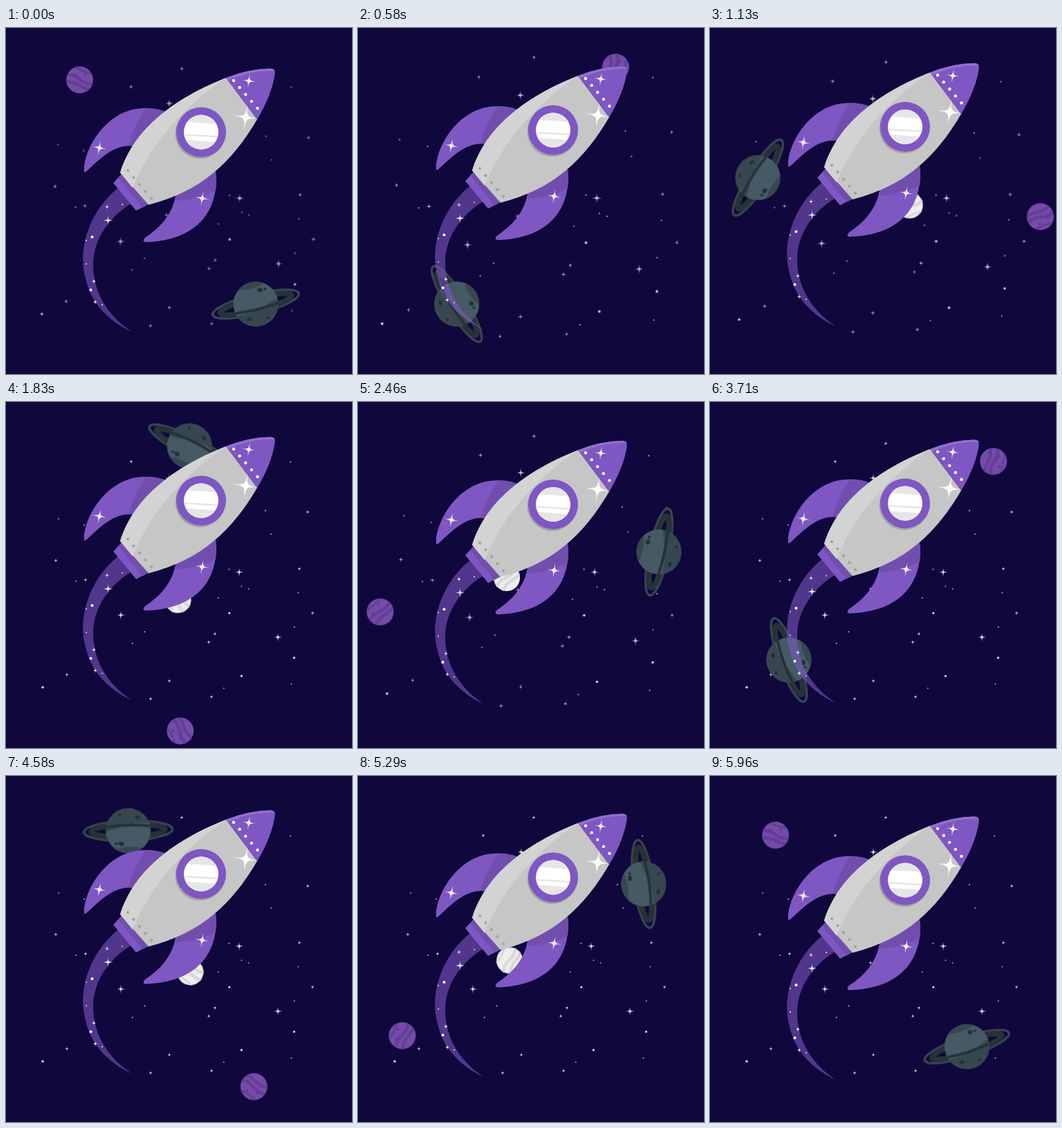
These frames come from a looping animation (500 by 500 pixels, 6 s). An HTML page:

```html
<!DOCTYPE html>
<html lang="en">
<head>
<meta charset="utf-8">
<title>Rocket in space</title>
<style>
html, body { margin: 0; width: 100%; height: 100%; overflow: hidden; background: #10073d; }
svg { display: block; width: 100vw; height: 100vh; }
</style>
</head>
<body>
<svg viewBox="0 0 500 500">
  <defs>
    <clipPath id="globe"><circle r="32.5"/></clipPath>
    <clipPath id="ball"><circle r="19.4"/></clipPath>
    <clipPath id="glass"><circle cx="282" cy="150.5" r="25"/></clipPath>
    <g id="stripes" clip-path="url(#ball)" fill="none" stroke-width="4.5">
      <path d="M-20,-8Q-9,-9 0,-1T20,6"/>
      <path d="M-20,3Q-8,2 0,8T18,14"/>
      <path d="M-6,-19Q4,-11 19,-9" stroke-width="3"/>
    </g>
  </defs>

  <g id="stars" fill="#fff" opacity=".82"></g>

  <g id="orbit">
    <g transform="translate(106.5 75)">
      <circle r="19.4" fill="#744ba9"/>
      <use href="#stripes" stroke="#623e97"/>
      <g fill="#5b388e"><circle cx="-7" cy="-8" r="2"/><circle cx="8" cy="-7" r="1.8"/></g>
    </g>
    <g transform="translate(230.8 217.9)">
      <circle r="19" fill="#eee"/>
      <use href="#stripes" stroke="#d8d8d8"/>
    </g>
    <g transform="translate(361 399)">
      <g transform="rotate(-14)" fill="none">
        <ellipse rx="64" ry="14.2" stroke="#37474f" stroke-width="3.5"/>
        <ellipse rx="53" ry="9.5" stroke="#263238" stroke-width="8"/>
      </g>
      <circle r="32.5" fill="#455a64"/>
      <g clip-path="url(#globe)">
        <g fill="#37474f">
          <path d="M-26,-20Q-4,-20 10,-29L20,-36H-20Z"/>
          <path d="M-34,18Q-8,16 10,4T36,-10V40H-34Z"/>
        </g>
        <g fill="#222f38">
          <ellipse cx="6" cy="-20.5" rx="3.8" ry="3"/><circle cx="13" cy="-22" r="2"/>
          <ellipse cx="-9" cy="22" rx="3.8" ry="2.5"/><circle cx="17" cy="20" r="2.2"/>
        </g>
      </g>
      <path transform="rotate(-14)" d="M-32,6Q0,10 32,6" fill="none" stroke="#263238" stroke-width="4"/>
    </g>
  </g>

  <g id="rocket">
    <path fill="#7e57c2" opacity=".6" d="M162,231C120,265 103,320 115,362C122,395 145,422 182,439C145,415 126,380 126,342C126,305 150,272 182,253Z"/>

    <g fill="#7e57c2">
      <path d="M113,207C111,174 154,95 231,121L187,171C160,166 140,185 118,205.5Q113,210 113,207Z"/>
      <path d="M303,207C309,272 268,308 201,309.5Q196,307.5 201,303C220,290 240,272 245,242Z"/>
      <path d="M168,210L155,224L188,264L205,255Z"/>
    </g>
    <g fill="#714eae">
      <path d="M202,116Q217,115.5 231,121L187,171L177,170Q184,143 202,116Z"/>
      <path d="M303,207Q305,222 303,235Q277,248 245,250V242Z"/>
      <path d="M168,210L162,216.5L197,259.5L206,255Z"/>
    </g>

    <path fill="#c6c6c6" d="M165,209C181,157 227,108 318,72L363,132C327,193 283,236 206,255.5Z"/>
    <path fill="#d3d3d3" d="M165,209C181,157 227,108 318,72C268,106 212,158 183,231Z"/>
    <path fill="#7e57c2" d="M318,72Q350,59 382,58.5Q390,59 388.5,67Q384,97 363,132Z"/>
    <path fill="#936fce" d="M318,72Q350,59 382,58.5Q388,59 388.5,62Q352,61 321,76Z"/>
    <g id="rivets" fill="#a2a2a2"></g>

    <circle cx="280.5" cy="153" r="36" fill="#a3a3a3"/>
    <circle cx="282" cy="150.5" r="36" fill="#7e57c2"/>
    <g clip-path="url(#glass)">
      <path fill="#fff" d="M250,120H310V180H250Z"/>
      <g fill="#e6e6e6">
        <path d="M250,120H310V139L250,135Z"/>
        <path d="M250,152.5L310,156V158.5L250,155Z"/>
        <path d="M250,161L310,165V180H250Z"/>
      </g>
    </g>
    <g id="sparks" fill="#fff"></g>
  </g>
</svg>
<script>
const $ = id => document.getElementById(id);
const dot = (x, y, r) => `<circle cx="${x}" cy="${y}" r="${r}"/>`;

// Thin four-pointed star: one curved arm edge, turned four times
function star(x, y, r, tilt = 0) {
  const k = r * 0.07;
  const arm = `M0,${-r}C${k},${-k} ${k},${-k} ${r},0L0,0Z`;
  return [0, 90, 180, 270]
    .map(a => `<path transform="translate(${x} ${y}) rotate(${a + tilt})" d="${arm}"/>`).join('');
}

const repeat = (n, make) => Array.from({ length: n }, (_, i) => make(i)).join('');
const row = (x, y, dx, dy, r) => repeat(5, i => dot(x + i * dx, y + i * dy, r));
const starsAt = (list, r, tilt) =>
  list.split(' ').map(p => star(...p.split(',').map(Number), r, tilt)).join('');

let seed = 7;
const random = () => (seed = seed * 16807 % 2147483647) / 2147483647;
const dust = i => dot(53 + random() * 394, 66 + random() * 376, i % 5 ? 0.9 : 1.7);

$('stars').innerHTML =
  repeat(30, dust) +
  starsAt('254,60 181,86 436,159 424,241 72,229 115,257 232,270 88,394 236,403 209,429 297,426 443,305 302,335 293,347', 4) +
  starsAt('236,110 337,246 166,308 393,340', 6.7);

$('rivets').innerHTML = row(176, 206, 8.5, 10.1, 2.1);

$('sparks').innerHTML =
  row(329, 76, 8.6, 10, 2.2) +
  star(351, 76.5, 10, 8) + star(346.5, 129, 18, 8) +
  starsAt('135,173 283.5,246', 10.5, 10) +
  star(147.5, 278, 7.2) + starsAt('146,258.5 127,366 129,396', 4.5) +
  dot(124.5, 302, 2) + dot(122.5, 378.5, 2) +
  dot(168, 255, 0.9) + dot(116, 307, 0.9) + dot(116, 341, 0.9) + dot(139, 400, 0.9);

const FPS = 24, FRAMES = 144;
const ORBIT_STEPS = 30, ORBIT_TURN = 4;   // steps per second, degrees per step
const PEAKS = [728, 2853], SPAN = 860;    // star field swells, in ms

const smooth = u => u * u * (3 - 2 * u);
const swell = (t, peak) => smooth(Math.max(0, 1 - Math.abs(t - peak) / SPAN));

function draw(frame) {
  const t = frame * 1000 / FPS;
  const turn = Math.round(frame * ORBIT_STEPS / FPS) * ORBIT_TURN;
  const zoom = PEAKS.reduce((sum, peak) => sum + 0.1 * swell(t, peak), 1);
  const lift = 4.5 * (1 - Math.cos(t / 3000 * 2 * Math.PI));
  $('orbit').setAttribute('transform', `rotate(${turn} 252 248.7)`);
  $('stars').setAttribute('transform', `translate(250 250) scale(${zoom}) translate(-250 -250)`);
  $('rocket').setAttribute('transform', `translate(0 ${-lift})`);
}

const start = performance.now();
function loop() {
  const t = performance.now() - start;
  draw(Math.floor((t + 4) * FPS / 1000) % FRAMES);
  requestAnimationFrame(loop);
}
draw(0);
requestAnimationFrame(loop);
</script>
</body>
</html>
```
